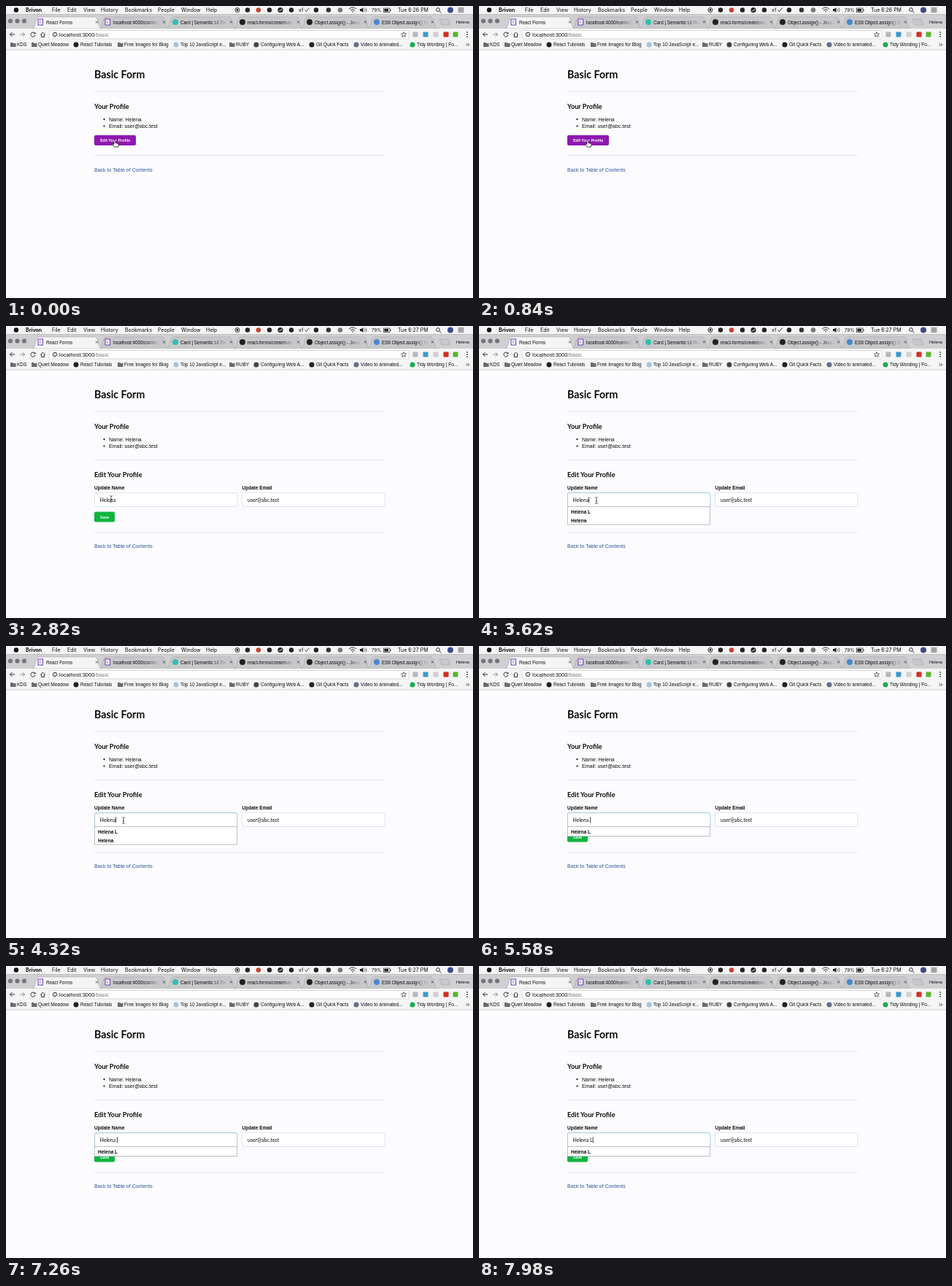
Recreate the animation shown at these times as an HTML page. Size 640 px wide and 400 px high, loop 8000 ms.

```html
<!DOCTYPE html>
<html lang="en">
<head>
<meta charset="utf-8">
<title>Basic Form</title>
<style>
  html, body { margin: 0; width: 100%; height: 100%; overflow: hidden; background: #fcfcfe; }
  svg { display: block; }
  #stage { width: 100vw; height: 100vh; }
  text { white-space: pre; fill: #0c0c0e; }
  .menu { font: 7px Inter, sans-serif; }
  .tab { font: 6.3px "Liberation Sans", Arial, sans-serif; }
  .bar { font: 6.5px "Liberation Sans", Arial, sans-serif; }
  .url { font: 7.5px "Liberation Sans", Arial, sans-serif; }
  .body { font: 7px "Liberation Sans", Arial, sans-serif; }
  .label { font: bold 6.5px "Liberation Sans", Arial, sans-serif; }
  .title { font: bold 14.2px Lato, sans-serif; }
  .heading { font: bold 9.2px Lato, sans-serif; }
  .field { font: 7px Lato, sans-serif; }
  .button { font: bold 5.8px Lato, sans-serif; fill: #fff; }
  .link { fill: #2c569a; }
  .bold { font-weight: 700; }
  .line { fill: none; stroke: #303034; stroke-width: 1; }
</style>
</head>
<body>
<svg id="stage" viewBox="0 0 640 400"></svg>
<script>
const LOOP = 8000;
const NAME = "Helena", EMAIL = "user@abc.test";
const FORM_OPENS = 900, CLOCK_TICKS = 2000, FOCUS = 3150, SPACE_TYPED = 5200, LETTER_TYPED = 7420;
const PAGE = "#fcfcfe", MENU = "#f4f4f5", STRIP = "#d0d0d2", TAB = "#c8c8ca", TOOLBAR = "#f5f5f6";
const EDGE = "#a4a4a8", RULE = "#e2e4f0", FOCUS_EDGE = "#a3c6dc", LIST_EDGE = "#b8c0c4";

const text = (x, y, cls, s, extra = "") => `<text x="${x}" y="${y}" class="${cls}" ${extra}>${s}</text>`;
const rect = (x, y, w, h, fill, extra = "") => `<rect x="${x}" y="${y}" width="${w}" height="${h}" fill="${fill}" ${extra}/>`;
const dot = (x, y, r, fill) => `<circle cx="${x}" cy="${y}" r="${r}" fill="${fill}"/>`;
const path = (d, style = "") => `<path class="line" d="${d}" style="${style}"/>`;
const ring = (x, y, r) => `<circle class="line" cx="${x}" cy="${y}" r="${r}"/>`;
const rule = y => rect(121, y, 398, 1, RULE);
const box = (x, id = "") => rect(x, 228.5, 195.5, 19, "#fff", `rx="1.5" stroke="${RULE}" ${id}`);

function menuBar() {
  const items = [["File", 63], ["Edit", 84], ["View", 106], ["History", 130], ["Bookmarks", 163],
    ["People", 208], ["Window", 240], ["Help", 274]];
  const icons = [[331, "#222"], [346, "#c8402c"], [361, "#222"], [391, "#222"], [425, "#222"], [442, "#333"], [458, "#777"]];
  return rect(0, 0, 640, 11, MENU) + dot(14, 5.5, 3.2, "#111")
    + text(27, 8.2, "menu bold", "Brivon")
    + items.map(([s, x]) => text(x, 8.2, "menu", s)).join("")
    + ring(317, 5.5, 3) + dot(317, 5.5, 1.4, "#222")
    + icons.map(([x, c]) => dot(x, 5.5, 3.2, c)).join("")
    + dot(376, 5.5, 3.6, "#222") + path("M374 5.5l1.5 1.5 2.7-3", "stroke:#fff")
    + text(401, 8.2, "menu", "xf") + path("M409.5 5.5l2 2 4-5")
    + path("M470 4q5-4 10 0M472 6q3-2.4 6 0M474 8q1-.8 2 0")
    + `<path d="M485 4h2l2.5-2v7l-2.5-2h-2z" fill="#222"/>` + path("M491 3.5q1.5 2 0 4M493 2.5q2.5 3 0 6", "stroke-width:.7")
    + text(501, 8, "menu", "79%", 'style="font-size:6.2px"')
    + rect(517.5, 3, 8.5, 5.5, "none", 'stroke="#222" stroke-width=".7"') + rect(518.5, 4, 5.5, 3.5, "#222") + rect(526.5, 4.5, 1, 2.5, "#222")
    + text(537, 8.2, "menu", "", 'id="clock"')
    + ring(592, 5, 2.4) + path("M594 7l2.5 2.5")
    + dot(609, 5.5, 4, "#3c4a8c")
    + path("M619.5 3h8M619.5 5.5h8M619.5 8h8");
}

function tabStrip() {
  const tabs = [["React Forms", "#6638b8"], ["localhost:4000/contacts", "#6638b8"], ["Card | Semantic UI React", "#35bdb2"],
    ["react-forms/createbasic", "#222"], ["Object.assign() - JavaScript", "#222"], ["ES6 Object.assign() Support", "#4a86d0"]];
  const tab = ([title, color], i) => {
    const x = 36 + 92 * i, active = i === 0;
    const icon = i < 2
      ? rect(x + 8, 18, 6.5, 8, "#fff", `stroke="${color}"`) + path(`M${x + 9.5} 21h3M${x + 9.5} 23h2`, `stroke:${color};stroke-width:.7`)
      : dot(x + 12, 22, 4, color);
    return `<path d="M${x} 31q2 0 3-3l3-10q1-3 3-3h77q2 0 3 3l3 10q1 3 3 3z" fill="${active ? TOOLBAR : TAB}" stroke="${EDGE}" stroke-width=".6"/>`
      + icon
      + `<svg x="${x + 19}" y="15" width="65" height="15">${text(0, 10, "tab", title)}`
      + (active ? "" : rect(45, 0, 20, 15, "url(#fade)")) + "</svg>"
      + path(`M${x + 87} 20.5l3 3m0-3l-3 3`, "stroke-width:.7");
  };
  return rect(0, 11, 640, 20, STRIP) + rect(0, 11, 640, .6, "#b4b4b8")
    + [6, 15.5, 25].map(x => dot(x, 20.5, 3.1, "#77777a")).join("")
    + tabs.map(tab).reverse().join("")
    + `<path d="M594 18h12l3 8h-12z" fill="${TAB}" stroke="${EDGE}" stroke-width=".6"/>`
    + text(617, 24.2, "tab", NAME, 'style="font-size:5.7px"');
}

function toolBar() {
  const extensions = [[561, "#b8b8bc"], [575, "#3f9ac8"], [589, "#d0d0d2"], [603, "#d62a22"], [616, "#5cb52c"]];
  return rect(0, 31, 640, 29, TOOLBAR)
    + path("M12 39h-6.5m3-3l-3 3 3 3") + path("M19 39h6.5m-3-3l3 3-3 3", "opacity:.5")
    + path("M39.5 37.5a3 3 0 1 0 .3 2.5m.2-4v2h-2.3")
    + path("M47 39.5l3.5-3.5 3.5 3.5M48.5 39v3.5h4V39")
    + rect(59, 33.5, 493, 11.5, "#fff", 'rx="1.5" stroke="#cdcdd0" stroke-width=".7"')
    + ring(67, 39, 2.8) + path("M67 38.5v2.2M67 37v.7", "stroke-width:.7")
    + text(73, 41.5, "url", 'localhost:3000<tspan fill="#77777a">/basic</tspan>')
    + path("M545 35.5l1 2.5h2.6l-2 1.7.8 2.6-2.4-1.5-2.4 1.5.8-2.6-2-1.7h2.6z", "stroke-width:.7")
    + extensions.map(([x, c]) => rect(x - 3.5, 35.5, 7, 7, c, 'rx="1"')).join("")
    + [36, 39, 42].map(y => dot(632, y, .9, "#444")).join("");
}

function bookmarks() {
  const folders = [["KDS", 15], ["Quiet Meadow", 44], ["Free Images for Blog", 162], ["RUBY", 315]];
  const sites = [["React Tutorials", 102, "#222"], ["Top 10 JavaScript e...", 239, "#a4c4dc"], ["Configuring Web A...", 349, "#444"],
    ["Git Quick Facts", 425, "#222"], ["Video to animated...", 486, "#5f7088"], ["Tidy Wording | Fo...", 563, "#18b04c"]];
  const folder = x => `<path d="M${x - 9} 50h3l1 1h3.5v5h-7.5z" fill="#6c6c70"/>`;
  return folders.map(([s, x]) => folder(x) + text(x, 55.2, "bar", s)).join("")
    + sites.map(([s, x, c]) => dot(x - 6, 53, 3.5, c) + text(x, 55.2, "bar", s)).join("")
    + path("M630.5 51l2 2-2 2m2.5-4l2 2-2 2", "stroke-width:.8")
    + rect(0, 59.5, 640, 1, "#d4d4d8");
}

const page = text(121, 99, "title", "Basic Form") + rule(117)
  + text(121, 141, "heading", "Your Profile")
  + dot(134.5, 155.2, 1.1, "#111") + text(141, 157.6, "body", "Name: " + NAME)
  + dot(134.5, 164.6, 1.1, "#111") + text(141, 167, "body", "Email: " + EMAIL);

const profile = rect(121, 177, 57, 14, "#9018b0", 'rx="2"') + text(129, 186.3, "button", "Edit Your Profile")
  + rule(204) + text(121, 226.5, "body link", "Back to Table of Contents");

const form = rule(183) + text(121, 207, "heading", "Edit Your Profile")
  + text(121, 224, "label", "Update Name") + text(323.5, 224, "label", "Update Email")
  + box(121.5, 'id="nameBox"') + box(323.5)
  + text(128.5, 241, "field", NAME, 'id="nameText"') + text(331, 241, "field", EMAIL)
  + rect(0, 234.2, .8, 8, "#111", 'id="caret"')
  + rect(121, 254.5, 28, 14, "#10b440", 'rx="2"') + text(129, 264, "button", "Save")
  + rule(282) + text(121, 304.3, "body link", "Back to Table of Contents")
  + `<g id="dropdown">${rect(121.5, 247.5, 195, 13, "#fff", `id="list" stroke="${LIST_EDGE}"`)}`
  + text(126, 257, "label", NAME + " L") + text(126, 269, "label", NAME, 'id="second"') + "</g>";

const cursors = `<g id="hand"><path d="M-1 .5q1-1.5 2 0v3l3.5 1q1 .4.8 1.6l-.7 3H-.6L-3.4 5.6q.3-1.4 1.5-.6l.9.8z" fill="#fff" stroke="#111" stroke-width=".8"/></g>`
  + `<g id="arrow"><path d="M0 0v7l1.6-1.5 1.2 2.7 1.3-.6-1.2-2.6h2.2z" fill="#111" stroke="#fff" stroke-width=".5"/></g>`
  + `<g id="beam">${path("M-1.8-4.3q1.8 0 1.8 1v6.6q0 1-1.8 1M1.8-4.3q-1.8 0-1.8 1M1.8 4.3q-1.8 0-1.8-1M-1 .8h2", "stroke-width:.8")}</g>`;

document.getElementById("stage").innerHTML =
  `<defs><linearGradient id="fade"><stop stop-color="${TAB}" stop-opacity="0"/><stop offset=".95" stop-color="${TAB}"/></linearGradient></defs>`
  + rect(0, 0, 640, 400, PAGE) + menuBar() + tabStrip() + toolBar() + bookmarks()
  + page + `<g id="profile">${profile}</g><g id="form">${form}</g>` + cursors;

const el = id => document.getElementById(id);
const show = (id, on) => { el(id).style.display = on ? "" : "none"; };

// Pointer waypoints: time, x, y
const route = [[0, 149, 184], [800, 149, 184], [1000, 148, 184], [1900, 148, 184], [2400, 145, 218],
  [2650, 144, 237], [2850, 144, 237], [3100, 161, 239], [LOOP, 161, 239]];

function pointerAt(t) {
  const i = route.findIndex(p => p[0] > t);
  const [t0, x0, y0] = route[i - 1], [t1, x1, y1] = route[i];
  const k = (t - t0) / (t1 - t0), e = k * k * (3 - 2 * k);
  return [x0 + (x1 - x0) * e, y0 + (y1 - y0) * e];
}

function draw(t) {
  const editing = t >= FORM_OPENS, focused = t >= FOCUS, typing = t >= SPACE_TYPED;
  show("profile", !editing);
  show("form", editing);
  el("clock").textContent = t < CLOCK_TICKS ? "Tue 6:26 PM" : "Tue 6:27 PM";

  el("nameText").textContent = NAME + (t >= LETTER_TYPED ? " L" : typing ? " " : "");
  el("nameBox").setAttribute("stroke", focused ? FOCUS_EDGE : RULE);
  show("dropdown", focused);
  show("second", !typing);
  el("list").setAttribute("height", typing ? 13 : 24.5);

  // The caret blinks, restarting solid after each key press
  const lastInput = [LETTER_TYPED, SPACE_TYPED, FOCUS].find(s => t >= s);
  const caretOn = focused && (t - lastInput) % 1000 < 580;
  show("caret", caretOn);
  if (caretOn) el("caret").setAttribute("x", 128.7 + el("nameText").getComputedTextLength());

  const [x, y] = pointerAt(t);
  const shape = !editing ? "hand" : y < 229 ? "arrow" : "beam";
  for (const id of ["hand", "arrow", "beam"]) {
    show(id, id === shape && !typing);
    el(id).setAttribute("transform", `translate(${x} ${y})`);
  }
}

function frame(now) {
  draw(now % LOOP);
  requestAnimationFrame(frame);
}
draw(0);
requestAnimationFrame(frame);
</script>
</body>
</html>
```
